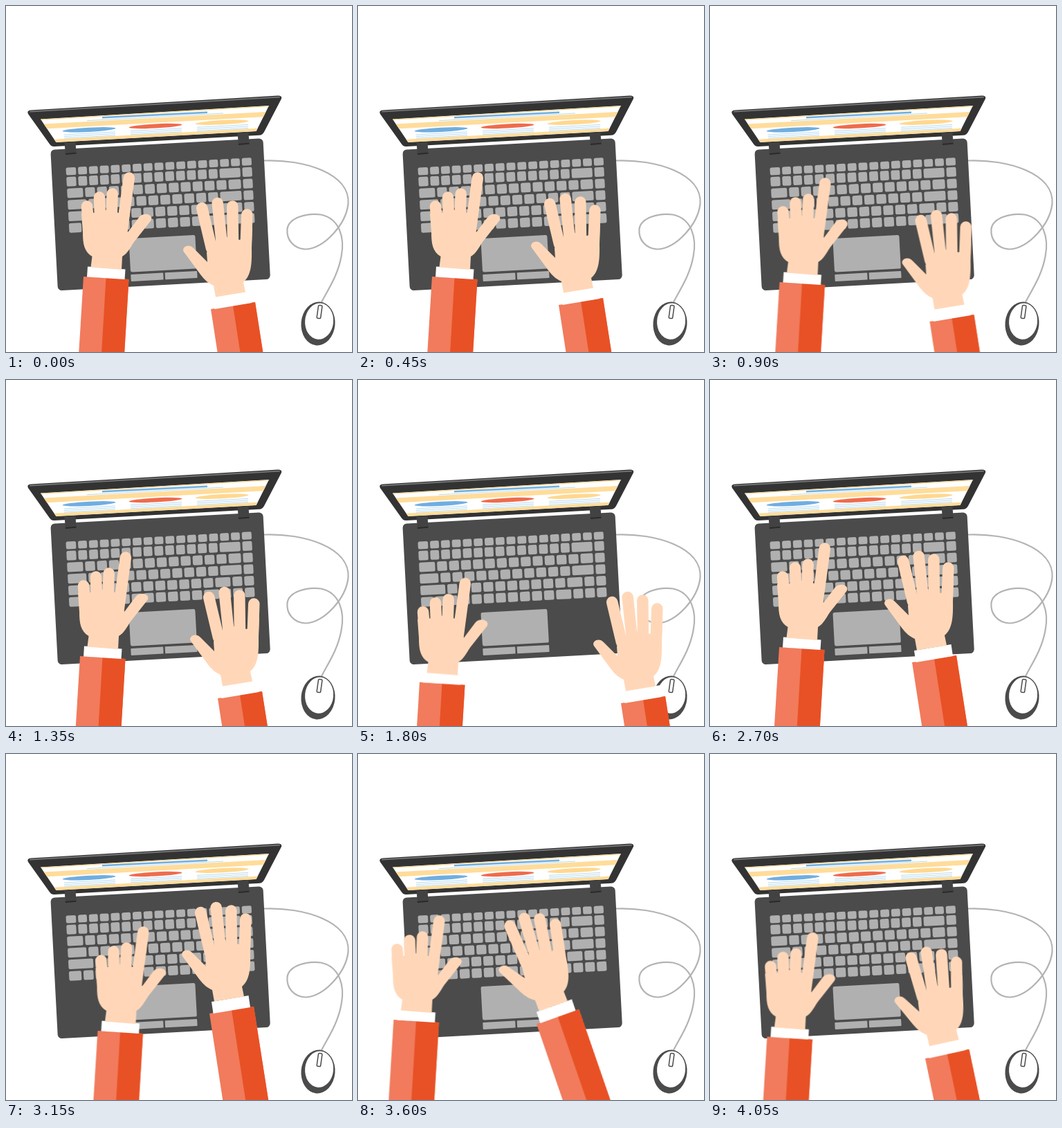
An HTML page that plays this animation: 500x500 px, repeating every 4.5 s.

```html
<!DOCTYPE html>
<html lang="en">
<head>
<meta charset="utf-8">
<title>Typing hands</title>
<style>
html, body { margin: 0; width: 100%; height: 100%; overflow: hidden; background: #fff; }
svg { display: block; width: 100%; height: 100%; }
#right { transform-origin: 296px 438px; }
.skin { fill: #ffd7b8; }
.finger { stroke: #ffd7b8; stroke-width: 16.5; stroke-linecap: round; fill: none; }
.light { fill: #f17b5c; }
.deep { fill: #e85125; }
.key { fill: #b0b0b0; }
.band { stroke: #ffdc9a; }
.print { stroke: #b9dcf2; stroke-width: 1; fill: none; }
</style>
</head>
<body>
<svg viewBox="0 0 500 500">
  <defs>
    <clipPath id="screen"><path d="M50 163.5L380 144L361.5 181L72.5 197Z"/></clipPath>
  </defs>

  <!-- mouse and cable -->
  <path d="M372 223.5C430 221 498 242 494.500 286C491 316 460 350 433 351.500C416 351 405 338 406.500 322C409 306 434 299 455 301.500C482 307 490 335 484.500 362C479 392 463 413 455 430" fill="none" stroke="#b3b3b3" stroke-width="2.200"/>
  <g transform="rotate(5 451 459)">
    <ellipse cx="451" cy="459" rx="24.500" ry="31.500" fill="#4b4b4b"/>
    <ellipse cx="452.300" cy="455.500" rx="20.500" ry="26.200" fill="#fff"/>
  </g>
  <rect x="450.300" y="432.500" width="5.500" height="19" rx="1.500" transform="rotate(8 453 442)" fill="#fff" stroke="#4b4b4b" stroke-width="1.500"/>

  <!-- base, keyboard and touchpad share one tilt -->
  <g transform="translate(64.300 207.700) rotate(-3.100)">
    <rect width="307.500" height="204" rx="6" fill="#4b4b4b" transform="skewX(-.1)"/>
    <g id="keys" transform="translate(20.700 27.100)"></g>
    <g class="key" transform="translate(106 134.400)">
      <rect width="96" height="48.500" rx="2.500"/>
      <rect y="52" width="47" height="10" rx="1"/>
      <rect x="49.500" y="52" width="46.500" height="10" rx="1"/>
    </g>
  </g>

  <!-- lid -->
  <path d="M36 150.500L393 129.500Q399.500 129.500 398 134L373 182Q370.500 186.500 366 186.800L70 203Q65.500 203.300 63 199.500L32 156Q29.500 151 36 150.500Z" fill="#333"/>
  <path d="M35 152.700L395 131.700" stroke="#777" stroke-width="1.800" stroke-linecap="round"/>
  <g clip-path="url(#screen)">
    <path d="M40 140H390V200H40Z" fill="#fff"/>
    <path class="band" d="M50 164.300L380 144.800" stroke-width="1.600"/>
    <path class="band" d="M50 174.300L380 156.300" stroke-width="7"/>
    <path class="band" d="M60 195.500L370 178.500" stroke-width="4.500"/>
    <path d="M139 161.200L291 153.700" stroke="#70aee0" stroke-width="2.600"/>
    <path class="print" d="M117 165.700L314 155"/>
    <g id="panels"></g>
  </g>

  <!-- hinges -->
  <g id="hinge">
    <path d="M84.500 197.500L100.500 196.500L101.500 213.500L86 215Z" fill="#424242"/>
    <path d="M86 214L101.500 212.700" stroke="#2a2a2a" stroke-width="1.800"/>
  </g>
  <use href="#hinge" x="250" y="-14"/>

  <g id="left">
    <path class="light" d="M112 391L177.500 395L164 620H98Z"/>
    <path class="deep" d="M144.500 393L177.500 395L164 620H131Z"/>
    <path d="M118 376.500L172.500 380.500L171.500 395L117 391.500Z" fill="#fff"/>
    <path class="finger" d="M117 289.500L120 325M135 276.500L136.500 320M153.700 271.500L152 320M177.800 248.500L167.500 325"/>
    <path class="skin" d="M109 300L126 299L145 295L163 299L176 327L192.500 305C199 297 214 301 209.500 310L185 341C179 350 176 357 168 362L167 381L122.500 377.500L124.500 362C113 355 111 344 111 327Z"/>
  </g>

  <g id="right">
    <path class="light" d="M296 438L360 428L390 620H324Z"/>
    <path class="deep" d="M328 433L360 428L390 620H357Z"/>
    <path d="M299 421L352.500 412L355 429L301.500 438Z" fill="#fff"/>
    <path class="finger" d="M283.200 292L297 350M305.700 285L312 345M327.300 289.500L328 345M348.300 301.500L346.500 350"/>
    <path class="skin" d="M290 356L291 370L271 350C264 342 252 349 257.500 356L281 388C287 396 293 401 300 404L303 420.500L346 413.500L343 399C354 390 355.500 374 355 350L356 320L338 338L319 334L303 340Z"/>
  </g>
</svg>

<script>
const $ = id => document.getElementById(id);

function add(parent, tag, attrs) {
  const el = document.createElementNS(parent.namespaceURI, tag);
  for (const name in attrs) el.setAttribute(name, attrs[name]);
  parent.append(el);
}

// A row has a first key, plain keys that share the free width, a wide key and a tail
const GAP = 3, ROW_WIDTH = 268.5, TAIL = 14;

function addRow(y, height, first, count, wide, tail) {
  const free = ROW_WIDTH - first - wide - tail * TAIL - (count + tail + 1) * GAP;
  const widths = [first, ...Array(count).fill(free / count), wide, ...Array(tail).fill(TAIL)];
  let x = 0;
  for (const width of widths) {
    add($("keys"), "rect", { class: "key", x, y, width, height, rx: 2.2 });
    x += width + GAP;
  }
}

addRow(0, 11, 14.5, 14, 12.8, 1);
[[14, 13, 30, 1], [23, 12, 18, 1], [27, 11, 31, 1], [36, 10, 22, 2], [18, 10, 22, 3]]
  .forEach((row, i) => addRow(13.5 + 16.75 * i, 13.8, ...row));

["#70aee0", "#ee6c4d", "#ffd88f"].forEach((fill, i) => {
  const x = 120 + 96 * i, y = 178.8 - 5.3 * i;
  add($("panels"), "ellipse", {
    cx: x, cy: y, rx: 38.5, ry: 3.1, fill, transform: `rotate(-3 ${x} ${y})`
  });
  for (let line = 1; line <= 3; line++) {
    add($("panels"), "path", { class: "print", d: `M${x - 36} ${y + 4.7 + 2.5 * line}l74 -4` });
  }
});

// Hand poses: x, y, angle; each one is held, then jumps to the next
const STEP = 450;
const leftPoses = [
  [0, 0], [-5, 0], [-11.5, 8], [-5, 8], [-23, 45.6],
  [-15, -25], [-12, -5], [20.5, 9], [-60.5, -7], [-29.5, 17.5]
];
const rightPoses = [
  [0, 0], [-6, -6], [21.5, 18], [10, 22], [84, 29],
  [27, -17], [-4, -30], [-2, -63], [-38, -48, -10.2], [15, 2, -3]
];

function play(id, poses) {
  const frames = poses.map(([x, y, angle = 0], i) => ({
    transform: `translate(${x}px, ${y}px) rotate(${angle}deg)`,
    offset: i / poses.length,
    easing: "step-end"
  }));
  frames.push({ ...frames[0], offset: 1 });
  $(id).animate(frames, { duration: STEP * poses.length, iterations: Infinity });
}
play("left", leftPoses);
play("right", rightPoses);
</script>
</body>
</html>
```
